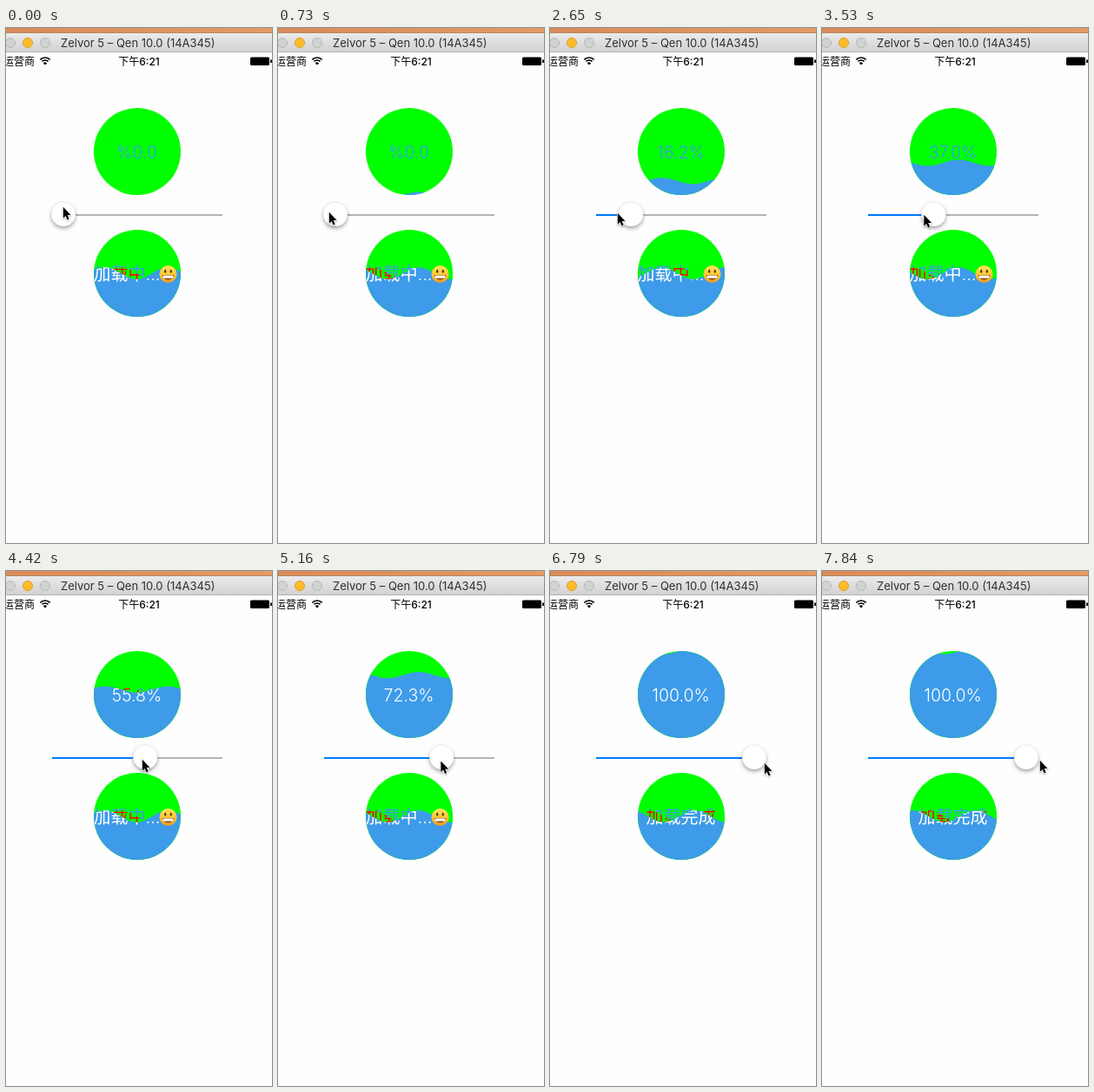
These frames come from a looping animation (306x592 px, 7990 ms). An HTML page with a canvas:

```html
<!DOCTYPE html>
<html lang="zh-CN">
<head>
<meta charset="utf-8">
<style>
html, body { margin: 0; width: 100%; height: 100%; overflow: hidden; background: #fefefe; }
canvas { display: block; width: 306px; height: 592px; }
</style>
</head>
<body>
<canvas id="stage" width="306" height="592"></canvas>
<script>
const ctx = document.getElementById('stage').getContext('2d');
const LOOP = 7990, STEPS = 54, TAU = Math.PI * 2;
const GREEN = '#00ff00', WATER = '#3d9be9', RED = '#ff0000';
const UI_FONT = "Inter, 'Noto Sans CJK SC', 'Noto Sans CJK', sans-serif";
const PERCENT_FONT = '300 19.5px ' + UI_FONT;
const STATUS_FONT = '300 20px ' + UI_FONT;
const WAVELENGTH = 72, WAVE_SPEED = 19.2;

// Keys: [step, value, ...]
const progressKeys = [[0, 0], [10, 0], [14, .02], [16, .08], [18, .162], [24, .37],
  [30, .558], [32, .645], [39, .828], [44, 1]];
const cursorKeys = [[0, 65, 205], [5, 58, 211], [10, 60, 212], [18, 77, 212], [30, 156, 216],
  [39, 211, 219], [46, 246, 220], [47, 252, 220], [49, 261, 219], [53, 250, 217]];

function at(keys, step, column = 1) {
  const next = keys.findIndex(k => k[0] > step);
  if (next < 0) return keys[keys.length - 1][column];
  const a = keys[next - 1], b = keys[next];
  return a[column] + (b[column] - a[column]) * (step - a[0]) / (b[0] - a[0]);
}

function rect(x, y, w, h, fill) {
  ctx.fillStyle = fill;
  ctx.fillRect(x, y, w, h);
}

function roundRect(x, y, w, h, r, fill) {
  ctx.beginPath();
  ctx.roundRect(x, y, w, h, r);
  ctx.fillStyle = fill;
  ctx.fill();
}

function disc(x, y, r, fill, stroke) {
  ctx.beginPath();
  ctx.arc(x, y, r, 0, TAU);
  ctx.fillStyle = fill;
  ctx.fill();
  if (stroke) {
    ctx.lineWidth = 1;
    ctx.strokeStyle = stroke;
    ctx.stroke();
  }
}

function text(str, x, y, font, fill, align = 'left') {
  ctx.font = font;
  ctx.fillStyle = fill;
  ctx.textAlign = align;
  ctx.fillText(str, x, y);
}

function vertical(y0, y1, ...colors) {
  const g = ctx.createLinearGradient(0, y0, 0, y1);
  colors.forEach((c, i) => g.addColorStop(i / (colors.length - 1), c));
  return g;
}

function drawChrome() {
  rect(0, 0, 306, 592, '#fefefe');
  const desktop = ctx.createLinearGradient(0, 0, 306, 0);
  desktop.addColorStop(0, '#d98a58');
  desktop.addColorStop(1, '#e39a66');
  rect(0, 0, 306, 6, desktop);
  rect(0, 5, 306, 1, '#b98665');
  rect(0, 6, 306, 21, vertical(6, 27, '#ebebeb', '#d2d2d2'));
  rect(0, 27, 306, 1, '#b4b4b4');
  disc(5, 17, 5.5, '#d2d2d2', '#b9b9b9');
  disc(25, 17, 5.5, '#fdbc2e', '#dd9f25');
  disc(45, 17, 5.5, '#d2d2d2', '#b9b9b9');
  text('Zelvor 5 – Qen 10.0 (14A345)', 63, 22, '13px ' + UI_FONT, '#303030');

  text('运营商', -3, 42.5, '12px ' + UI_FONT, '#000');
  text('下午6:21', 153, 42.5, '500 12px ' + UI_FONT, '#000', 'center');

  ctx.strokeStyle = '#000';
  ctx.lineWidth = 1.7;
  for (const r of [8, 5]) {
    ctx.beginPath();
    ctx.arc(45, 42, r, -Math.PI * .75, -Math.PI * .25);
    ctx.stroke();
  }
  ctx.beginPath();
  ctx.moveTo(45, 42.5);
  ctx.arc(45, 42.5, 3, -Math.PI * .75, -Math.PI * .25);
  ctx.fillStyle = '#000';
  ctx.fill();

  roundRect(281, 33.5, 22, 9.5, 1.5, '#000');
  rect(304, 36.5, 2, 3.5, '#000');
}

function clipWater(level, amplitude, crest) {
  ctx.beginPath();
  ctx.moveTo(100, 400);
  for (let x = 100; x <= 202; x++) {
    ctx.lineTo(x, level - amplitude * Math.cos((x - crest) / WAVELENGTH * TAU));
  }
  ctx.lineTo(202, 400);
  ctx.clip();
}

function drawGauge(cy, level, amplitude, crest, label) {
  const layer = (fill, color, waveCrest) => {
    ctx.save();
    if (waveCrest !== undefined) clipWater(level, amplitude, waveCrest);
    disc(151, cy, 50, fill);
    label(color);
    ctx.restore();
  };
  layer(GREEN, WATER);
  layer(GREEN, RED, crest + WAVELENGTH / 4);
  layer(WATER, '#fff', crest);
}

function drawSmiley(x, y) {
  disc(x, y, 10, vertical(y - 10, y + 10, '#ffe65a', '#fdc936', '#ec9a22'));
  for (const side of [-1, 1]) {
    ctx.beginPath();
    ctx.ellipse(x + side * 3.3, y - 3.3, 1.2, 1.9, 0, 0, TAU);
    ctx.fillStyle = '#5c3510';
    ctx.fill();
  }
  ctx.beginPath();
  ctx.ellipse(x, y + 1, 6.8, 5.4, 0, 0, Math.PI);
  ctx.closePath();
  ctx.fillStyle = '#8a4a1a';
  ctx.fill();
  roundRect(x - 6, y + 1.4, 12, 3.2, 1.2, '#fff');
}

function drawSlider(progress) {
  const x = 66 + 169 * progress;
  rect(53, 214, 196, 2, '#b4b6b4');
  rect(53, 214, x - 53, 2, '#007aff');
  ctx.save();
  ctx.shadowColor = 'rgba(0,0,0,.34)';
  ctx.shadowBlur = 4;
  ctx.shadowOffsetY = 2.5;
  disc(x, 214, 14, '#fff');
  ctx.restore();
  disc(x, 214, 14, '#fff', 'rgba(0,0,0,.07)');
}

function drawCursor(x, y) {
  ctx.save();
  ctx.translate(x + .8, y + .8);
  ctx.scale(.82, .86);
  ctx.beginPath();
  [[0, 0], [0, 15], [3.4, 11.8], [5.8, 17], [8.3, 16], [6, 10.8], [10.7, 10.6]]
    .forEach(p => ctx.lineTo(...p));
  ctx.closePath();
  ctx.shadowColor = 'rgba(0,0,0,.3)';
  ctx.shadowBlur = 2;
  ctx.shadowOffsetY = 1;
  ctx.lineWidth = 1.8;
  ctx.strokeStyle = '#fff';
  ctx.stroke();
  ctx.shadowColor = 'transparent';
  ctx.fillStyle = '#000';
  ctx.fill();
  ctx.restore();
}

function render(time) {
  const step = Math.min(STEPS - 1, Math.floor(time % LOOP / LOOP * STEPS + .14));
  const progress = at(progressKeys, step);
  const crest = 114 - WAVE_SPEED * step;
  const done = progress >= 1;
  const percent = progress ? (progress * 100).toFixed(1) + '%' : '%0.0';

  drawChrome();
  drawGauge(142, 192 - 100 * progress, 3.5, crest,
    color => text(percent, 150.5, 149.5, PERCENT_FONT, color, 'center'));
  drawGauge(282, 282, 6.8, crest, color => done
    ? text('加载完成', 150.5, 290, STATUS_FONT, color, 'center')
    : text('加载中...', 100.5, 290, STATUS_FONT, color));
  if (!done) drawSmiley(186.5, 283);
  drawSlider(progress);
  drawCursor(at(cursorKeys, step), at(cursorKeys, step, 2));
}

const start = performance.now();
function tick() {
  render(performance.now() - start);
  requestAnimationFrame(tick);
}
tick();
</script>
</body>
</html>
```
